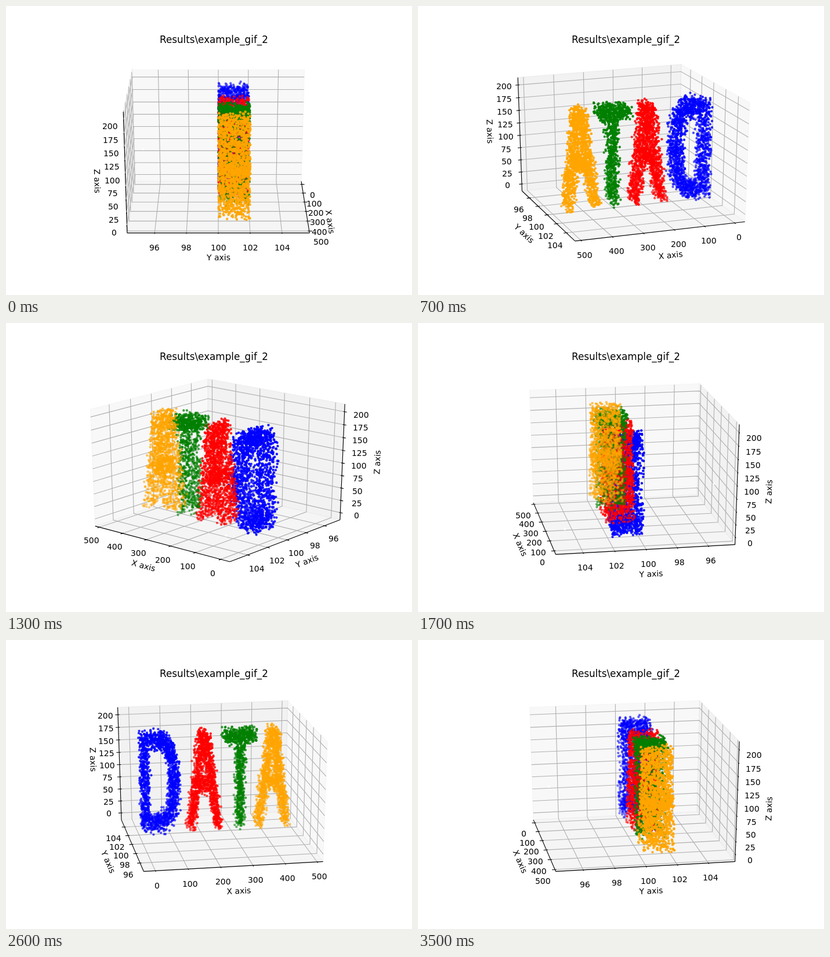
Recreate the animation shown at these times as an HTML page with a canvas. Size 700x500 px, loop 3600 ms.

```html
<!DOCTYPE html>
<html lang="en">
<head>
<meta charset="utf-8">
<title>Rotating scatter plot</title>
<style>
  html, body { margin: 0; width: 100%; height: 100%; overflow: hidden; background: #fff; }
  canvas { display: block; }
</style>
</head>
<body>
<canvas id="plot" width="700" height="500"></canvas>
<script>
const ctx = document.getElementById('plot').getContext('2d');
const FONT = '"DejaVu Sans", Verdana, sans-serif';
const LABEL_SIZE = 13.95, TITLE_SIZE = 16.75;
const STEP_MS = 100, STEPS = 36;

// Camera: distance 10, fixed elevation; the box is a unit cube around 0.
const DIST = 10, ELEV = 22 * Math.PI / 180;
const CE = Math.cos(ELEV), SE = Math.sin(ELEV);
const CX = 366.08, CY = 247.3, SX = 542.5 / 0.185, SY = 385 / 0.185;
const H = 0.5 + 1 / 48, DELTA = 1 / 12;
const PER_POINT = 48 / (72 * (5.425 + 3.85));
const TICK_PAD = 11.5 * PER_POINT * DELTA, LABEL_PAD = 25 * PER_POINT * DELTA;

const range = (from, to, step) =>
  Array.from({ length: Math.round((to - from) / step) + 1 }, (_, i) => from + i * step);

const AXES = [
  { name: 'X axis', min: -24.15, max: 507.15, ticks: range(0, 500, 100), tickDir: 1, flip: [1, 0], pane: 242 },
  { name: 'Y axis', min: 94.5, max: 105.5, ticks: range(96, 104, 2), tickDir: 0, flip: [0, 1], pane: 230 },
  { name: 'Z axis', min: -10, max: 210, ticks: range(0, 200, 25), tickDir: 0, flip: [0, 2], pane: 236 }
];
const unit = (i, v) => (v - AXES[i].min) / (AXES[i].max - AXES[i].min) - 0.5;

let seed = 20177;
function rand() {
  seed = (seed + 0x6D2B79F5) | 0;
  let t = Math.imul(seed ^ (seed >>> 15), 1 | seed);
  t = (t + Math.imul(t ^ (t >>> 7), 61 | t)) ^ t;
  return ((t ^ (t >>> 14)) >>> 0) / 4294967296;
}
const between = (a, b) => a + rand() * (b - a);

// Letter shapes in the x/z plane; every point is then shaken by up to NOISE.
const LOW = 5, TOP = 195, NOISE = 5;
const oval = (x, z, cx, rx, rz, p) =>
  Math.pow(Math.max(0, x - cx) / rx, p) + Math.pow(Math.abs(z - 100) / rz, p) < 1;

function inD(x, z) {
  return oval(x, z, 56, 68, 95, 2.5) && !(x > 27 && oval(x, z, 50, 44, 67, 2.8));
}
function inA(x, z, mid) {
  const d = Math.abs(x - mid), outer = 54 - 41 * (z - LOW) / (TOP - LOW);
  if (d > outer) return false;
  return d > outer - 20 || (z > 78 && z < 102);
}
function inT(x, z) {
  return z > 173 || (x > 309 && x < 329);
}

const LETTERS = [
  { color: 'blue', from: 5, to: 124, count: 1650, has: inD },
  { color: 'red', from: 150, to: 259, count: 1500, has: (x, z) => inA(x, z, 204.5) },
  { color: 'green', from: 269, to: 367, count: 900, has: inT },
  { color: 'orange', from: 369, to: 478, count: 1500, has: (x, z) => inA(x, z, 424) }
];

const points = [];
function addPoint(color, x, y, z) {
  points.push({ color, p: [unit(0, x), unit(1, y), unit(2, z)] });
}
addPoint('white', 9, 105, 25);
addPoint('white', 118, 95, 79);
for (const { color, from, to, count, has } of LETTERS) {
  for (let n = 0; n < count;) {
    const x = between(from, to), z = between(LOW, TOP);
    if (!has(x, z)) continue;
    addPoint(color, x + between(-NOISE, NOISE), between(100, 102), z + between(-NOISE, NOISE));
    n++;
  }
}

let ca = 1, sa = 0;
function project([x, y, z]) {
  const side = y * ca - x * sa, front = x * ca + y * sa;
  const depth = DIST - front * CE - z * SE;
  return {
    x: CX + SX * side / depth,
    y: CY - SY * (z * CE - front * SE) / depth,
    depth
  };
}

const withAt = (p, i, v) => { const q = p.slice(); q[i] = v; return q; };
const outward = (p, skip, pad) => p.map((v, i) => i === skip ? v : v + (v < 0 ? -pad : pad));

function trace(pts) {
  ctx.beginPath();
  for (const p of pts) {
    const q = project(p);
    ctx.lineTo(q.x, q.y);
  }
}
function polyline(pts, color) {
  trace(pts);
  ctx.strokeStyle = color;
  ctx.lineWidth = 1.11;
  ctx.stroke();
}
// Centred text that starts on a whole pixel
function text(str, x, y, size) {
  ctx.font = `${size}px ${FONT}`;
  ctx.fillStyle = '#000';
  ctx.fillText(str, Math.round(x - ctx.measureText(str).width / 2), Math.round(y));
}

function drawPane(i, far) {
  const [a, b] = [0, 1, 2].filter(k => k !== i);
  const corners = [[-H, -H], [H, -H], [H, H], [-H, H]]
    .map(([u, v]) => withAt(withAt(far, a, u), b, v));
  const g = AXES[i].pane;
  trace(corners);
  ctx.closePath();
  ctx.fillStyle = ctx.strokeStyle = `rgba(${g},${g},${g},0.5)`;
  ctx.lineWidth = 1.39;
  ctx.fill();
  ctx.stroke();
}

function drawAxis(i, far) {
  const { name, ticks, tickDir, flip } = AXES[i];
  const start = withAt(far, flip[0], -far[flip[0]]);
  const end = withAt(start, flip[1], -start[flip[1]]);
  polyline([start, end], '#000');

  const a = project(start), b = project(end);
  let angle = Math.atan2(a.y - b.y, b.x - a.x);
  angle = (angle + Math.PI) % Math.PI;
  if (angle > Math.PI / 2) angle -= Math.PI;
  const at = project(outward(withAt(start, i, 0), i, LABEL_PAD));
  ctx.save();
  ctx.translate(at.x, at.y);
  ctx.rotate(-angle);
  text(name, 0, 4, LABEL_SIZE);
  ctx.restore();

  const n1 = (i + 1) % 3, n2 = (i + 2) % 3;
  for (const t of ticks) {
    const p = withAt(far, i, unit(i, t));
    polyline([withAt(p, n1, -p[n1]), p, withAt(p, n2, -p[n2])], '#b0b0b0');
  }

  const sign = Math.sign(far[tickDir]) * DELTA;
  for (const t of ticks) {
    const p = withAt(start, i, unit(i, t)), edge = p[tickDir];
    polyline([withAt(p, tickDir, edge + 0.1 * sign), withAt(p, tickDir, edge - 0.2 * sign)], '#000');
    const q = project(outward(p, i, TICK_PAD));
    text(String(t), q.x, q.y + 10.6, LABEL_SIZE);
  }
}

// Far points fade; fill and outline each carry the same opacity.
function drawPoints() {
  const shown = points.map(({ color, p }) => ({ color, ...project(p) }));
  let near = Infinity, away = -Infinity;
  for (const s of shown) {
    s.z = -DIST / s.depth;
    near = Math.min(near, s.z);
    away = Math.max(away, s.z);
  }
  ctx.lineWidth = 1.39;
  for (const s of shown) {
    ctx.globalAlpha = 1 - 0.7 * (s.z - near) / (away - near);
    ctx.fillStyle = ctx.strokeStyle = s.color;
    ctx.beginPath();
    ctx.arc(s.x, s.y, 1.5, 0, 2 * Math.PI);
    ctx.fill();
    ctx.stroke();
  }
  ctx.globalAlpha = 1;
}

function draw(step) {
  const azim = step * 2 * Math.PI / STEPS;
  ca = Math.cos(azim);
  sa = Math.sin(azim);
  const far = [ca < 0 ? H : -H, sa < 0 ? H : -H, -H];
  ctx.fillStyle = '#fff';
  ctx.fillRect(0, 0, 700, 500);
  for (let i = 0; i < 3; i++) drawPane(i, far);
  for (let i = 0; i < 3; i++) drawAxis(i, far);
  drawPoints();
  text('Results\\example_gif_2', 358.75, 64, TITLE_SIZE);
}

const begin = performance.now();
let last = -1;
function tick() {
  const step = Math.floor((performance.now() - begin) / STEP_MS) % STEPS;
  if (step !== last) draw(last = step);
  requestAnimationFrame(tick);
}
tick();
</script>
</body>
</html>
```
